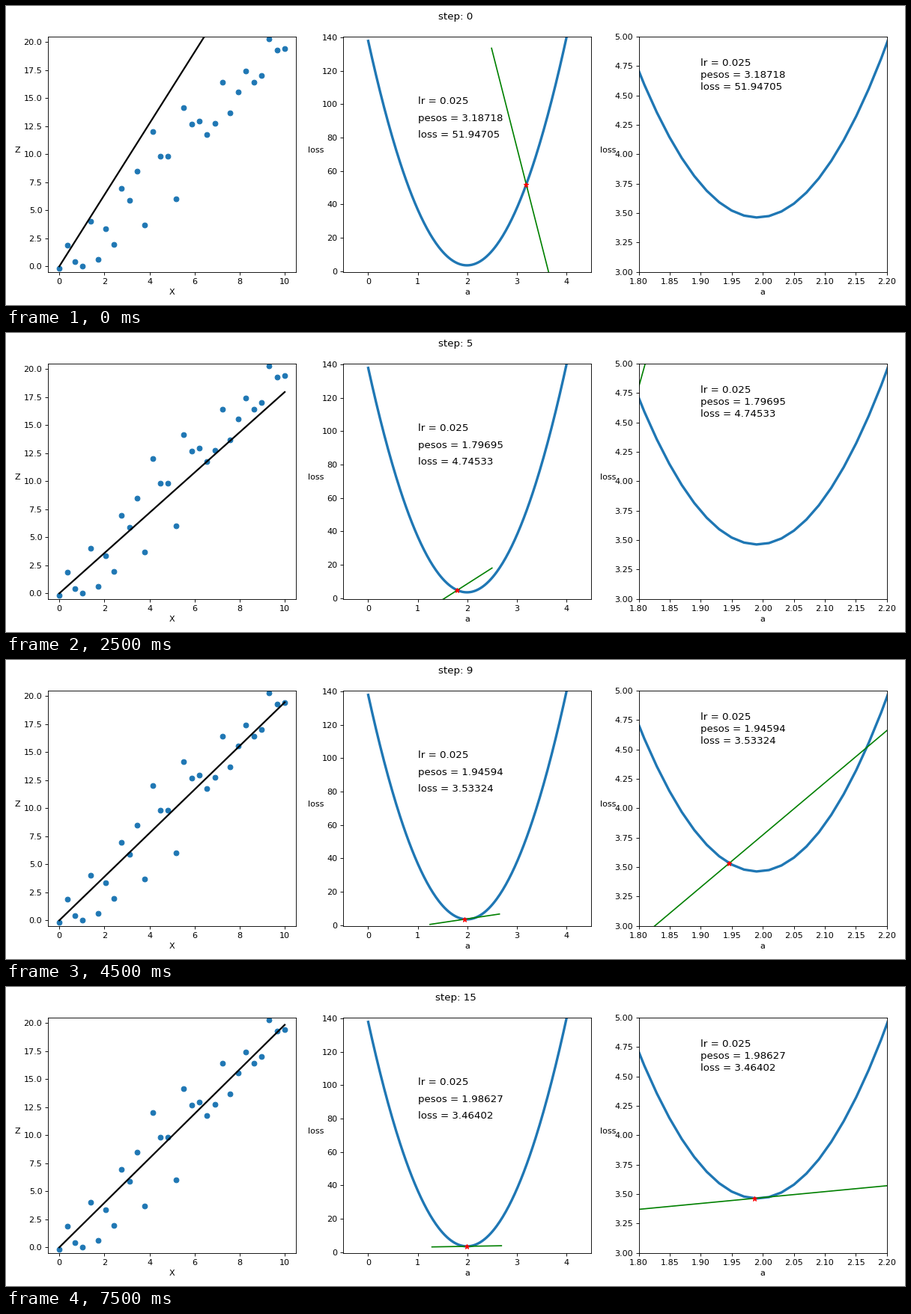
Write a matplotlib script that moves like this. It is 1200x400 px and loops after 8000 ms.

```python
import numpy as np
import matplotlib.pyplot as plt
from matplotlib.animation import FuncAnimation

W, H, DPI = 1200, 400, 80
LEFT, PITCH, WIDTH = 56.1, 394.27, 331.0
TOP, BOTTOM = 41.0, 355.78
STEPS, INTERVAL = 16, 500

# Least-squares fit z = a * x by gradient descent.
x = np.linspace(0, 10, 30)
z = [-0.2, 1.87, 0.4, 0.02, 4.0, 0.6, 3.33, 1.93, 6.93, 5.87,
     8.47, 3.67, 12.0, 9.8, 9.8, 6.05, 14.13, 12.67, 12.93, 11.73,
     12.73, 16.4, 13.67, 15.53, 17.4, 16.4, 17.0, 20.27, 19.33, 19.4]
LR = 0.025
CURV = np.mean(x ** 2)
BEST, MIN_LOSS = 1.991411, 3.463121
START_ERR = 1.1957696
RATIO = 1 - 2 * LR * CURV
REACH = 0.7


def loss(a):
    return MIN_LOSS + CURV * (a - BEST) ** 2


plt.rcParams.update({"font.family": "DejaVu Sans", "font.size": 10})
fig = plt.figure(figsize=(W / DPI, H / DPI), dpi=DPI, facecolor="white")
title = fig.suptitle("", fontsize=12)


def panel(col, xlim, ylim, xticks, yticks, xlabel, ylabel, label_x):
    left = LEFT + col * PITCH
    ax = fig.add_axes([left / W, 1 - BOTTOM / H, WIDTH / W, (BOTTOM - TOP) / H])
    ax.set(xlim=xlim, ylim=ylim, xticks=xticks, yticks=yticks)
    ax.set_xlabel(xlabel)
    ax.set_ylabel(ylabel, rotation=0)
    ax.yaxis.set_label_coords(label_x / W, 1 - (TOP + BOTTOM) / 2 / H,
                              transform=fig.transFigure)
    return ax


class LossView:
    """Loss curve with the current point, slope line and readout."""

    def __init__(self, ax, text_x, text_ys):
        a = np.linspace(0, 4, 200)
        ax.plot(a, loss(a), color="C0", lw=3)
        self.slope, = ax.plot([], [], color="green", lw=1.5)
        self.star, = ax.plot([], [], "*", color="red", ms=6)
        self.texts = [ax.text(text_x, y, "", fontsize=12) for y in text_ys]

    def update(self, a, grad):
        cur = loss(a)
        ends = np.array([-REACH, REACH])
        self.slope.set_data(a + ends, cur + grad * ends)
        self.star.set_data([a], [cur])
        lines = (f"lr = {LR}", f"pesos = {a:.5f}", f"loss = {cur:.5f}")
        for item, line in zip(self.texts, lines):
            item.set_text(line)


data_ax = panel(0, (-0.5, 10.5), (-0.5, 20.5), np.arange(0, 11, 2),
                np.arange(0, 20.1, 2.5), "X", "Z", 15.8)
data_ax.plot(x, z, "o", color="C0")
fit, = data_ax.plot([], [], color="black", lw=2)

wide_ax = panel(1, (-0.5, 4.5), (-0.5, 140.5), np.arange(5),
                np.arange(0, 141, 20), "a", "loss", 413.7)
zoom_ax = panel(2, (1.8, 2.2), (3, 5), np.linspace(1.8, 2.2, 9),
                np.linspace(3, 5, 9), "a", "loss", 803.7)
views = [LossView(wide_ax, 1, (100, 90, 80)),
         LossView(zoom_ax, 1.9, (4.75, 4.65, 4.55))]


def update(step):
    err = START_ERR * RATIO ** step
    a = BEST + err
    grad = 2 * CURV * err / RATIO  # gradient that led to this step
    title.set_text(f"step: {step}")
    fit.set_data(x, a * x)
    for view in views:
        view.update(a, grad)


anim = FuncAnimation(fig, update, frames=STEPS, interval=INTERVAL,
                     repeat=True, repeat_delay=0, blit=False)
plt.show()
```
